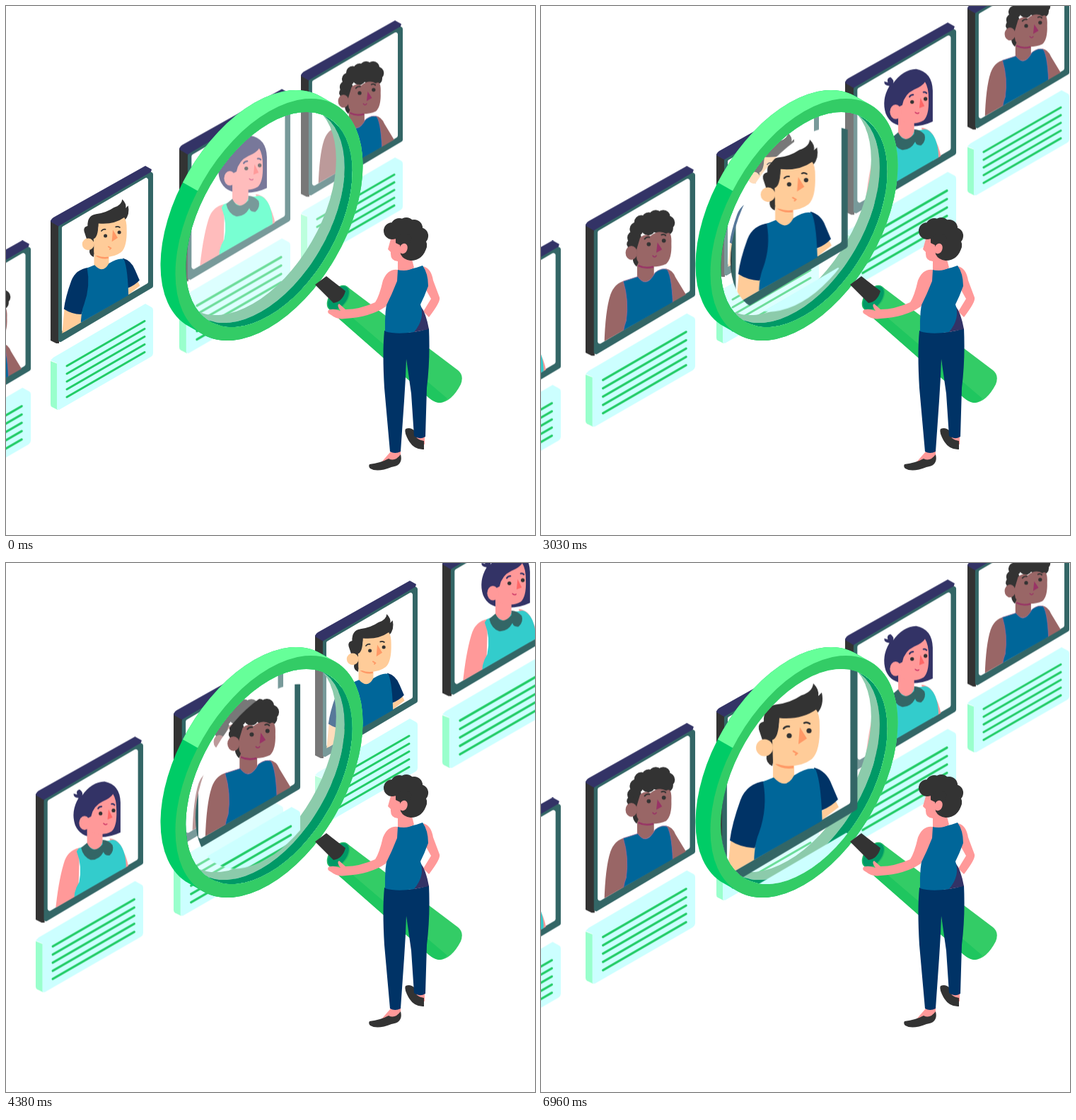
An HTML page without scripts that plays this animation: 748 by 748 pixels, repeating every 8.04 s.

```html
<!DOCTYPE html>
<html lang="en">
<head>
<meta charset="utf-8">
<title>Candidate search</title>
<style>
html, body { margin: 0; width: 100%; height: 100%; overflow: hidden; background: #fff; }
svg { display: block; width: 100%; height: 100%; }
.f { color: #3cc; }
.m, .d { color: #069; }

/* the row of cards jumps between five layouts */
.card { animation: slide 8.04s step-end infinite; }
.dye { animation: slide 8.04s step-end infinite, dye 8.04s step-end infinite; }
@keyframes slide {
  0% { transform: var(--a); }
  20.14% { transform: var(--b); }
  40.67% { transform: var(--c); }
  57.08% { transform: var(--d); }
  83.2%, 100% { transform: var(--e); }
}
@keyframes dye {
  0% { color: #3fb; }
  20.14%, 100% { color: #3cc; }
}

/* the enlarged view pops in and out around the lens centre */
.zoom { transform-origin: 350px 300px; animation: 8.04s linear infinite; }
.z1 { animation-name: z1; }
.z2 { animation-name: z2; }
.z3 { animation-name: z3; }
.z4 { animation-name: z4; }
.z5 { animation-name: z5; }
@keyframes z1 {
  0% { transform: scale(0); animation-timing-function: steps(8); }
  2.98% { transform: scale(1); }
  16.79% { transform: scale(1); animation-timing-function: steps(7); }
  19.4%, 100% { transform: scale(0); }
}
@keyframes z2 {
  0% { transform: scale(0); }
  20.52% { transform: scale(0); animation-timing-function: steps(9); }
  23.88% { transform: scale(1); }
  37.31% { transform: scale(1); animation-timing-function: steps(7); }
  39.92%, 100% { transform: scale(0); }
}
@keyframes z3 {
  0% { transform: scale(0); }
  40.67% { transform: scale(0); animation-timing-function: steps(9); }
  44.02% { transform: scale(1); }
  54.1% { transform: scale(1); animation-timing-function: steps(7); }
  56.71%, 100% { transform: scale(0); }
}
@keyframes z4 {
  0% { transform: scale(0); }
  57.08% { transform: scale(0); animation-timing-function: steps(9); }
  60.44%, 63.79% { transform: scale(1); }
  63.8% { transform: scale(.11); animation-timing-function: steps(8); }
  66.78% { transform: scale(1); }
  80.22% { transform: scale(1); animation-timing-function: steps(7); }
  82.83%, 100% { transform: scale(0); }
}
@keyframes z5 {
  0% { transform: scale(0); }
  83.2% { transform: scale(0); animation-timing-function: steps(9); }
  86.56%, 100% { transform: scale(1); }
}
</style>
</head>
<body>
<svg viewBox="0 0 748 748">
<defs>
  <clipPath id="window"><path d="M16-259L138-330V-178L16-108Z"/></clipPath>
  <clipPath id="hole"><ellipse id="glass" cx="372" cy="302" rx="166.6" ry="96.2" transform="rotate(-60 372 302)"/></clipPath>
  <clipPath id="lit"><path d="M200 221L272 262L560 426V90H200Z"/></clipPath>

  <g id="frame">
    <path fill="#333" d="M0-268L12-261V-94H8L0-98Z"/>
    <path fill="#336" d="M0-266Q0-269 4-272L134-345L143-340L141-333L12-259Z"/>
    <path fill="#366" stroke="#366" stroke-width="6" stroke-linejoin="round" d="M14-258L142-333V-175L14-99Z"/>
    <path fill="#fff" stroke="#fff" stroke-width="6" stroke-linejoin="round" d="M19-257L135-325V-181L19-113Z"/>
    <path fill="#9fc" d="M0-69L10-65V0L2-4Q0-5 0-8Z"/>
    <path fill="#cff" d="M0-70L4-74L134-150L143-145Q145-144 145-141V-80Q145-77 142-75L12 0L9-1V-66Z"/>
    <path stroke="#2c6" stroke-width="3" stroke-linecap="round" d="M23-62l110-63.5M23-51l110-63.5M23-40l110-63.5M23-29l110-63.5M23-18l110-63.5"/>
  </g>

  <g id="man">
    <use href="#frame"/>
    <g clip-path="url(#window)"><g transform="scale(.699) translate(-240 -596)">
      <path fill="#fc9" d="M268 392L263 445L303 425V400ZM390 355L417 337L421 345L395 365Z"/>
      <path fill="#036" d="M318 308Q291 311 282 335Q270 368 267 392Q282 402 302 403L320 360ZM386 289Q404 294 411 313L420 334Q411 344 396 350Z"/>
      <path fill="#333" d="M308 235Q306 226 315 224Q314 203 332 200Q352 198 368 187Q384 182 385 170Q394 179 392 188L397 183Q401 201 390 213L337 225L335 250L327 287Q317 282 319 272L313 250Z"/>
      <path fill="#fc9" d="M328 270L358 283V303Q343 320 328 308Z"/>
      <path fill="currentColor" d="M314 309L329 303Q346 322 358 300Q376 288 388 291Q397 310 398 380L301 430Q301 398 308 382Q321 346 314 309Z"/>
      <path fill="#f96" d="M331 284L357 285V290Q340 292 331 284Z"/>
      <path fill="#fc9" d="M337 219Q368 222 389 207Q394 213 394 230Q395 266 383 277Q370 287 350 287Q332 286 328 278L327 250Q336 248 337 219Z"/>
      <circle cx="316" cy="261" r="12" fill="#fc9"/>
      <path fill="#f96" d="M366 232L376 248L364 256Z"/>
      <path fill="none" stroke="#f96" stroke-width="2.5" stroke-linecap="round" d="M357 266l5 3l-2 2"/>
      <path fill="none" stroke="#333" stroke-width="2.5" stroke-linecap="round" d="M343 234q3-4 8-3M372 226q4-2 8 1"/>
      <circle cx="351" cy="244" r="3.6" fill="#333"/><circle cx="379" cy="237" r="3.6" fill="#333"/>
    </g></g>
  </g>

  <g id="lady">
    <use href="#frame"/>
    <g clip-path="url(#window)"><g transform="scale(.673) translate(-230 -602.5)">
      <path fill="#336" d="M316 213Q305 212 306 204L313 206Q310 198 318 196Q326 202 323 208Q342 181 368 180Q399 186 400 222V282Q377 293 352 291Q320 293 309 267Q300 240 316 213Z"/>
      <path fill="#f99" d="M318 313Q293 318 286 345Q274 385 268 455L310 430Q305 405 316 385ZM378 294Q398 296 405 318Q416 338 419 370L405 372Z"/>
      <path fill="currentColor" d="M316 314L335 306L384 297Q391 297 396 303Q409 315 411 345L411 372L308 425Q304 402 317 382Q324 350 312 320Z"/>
      <path fill="#f99" d="M333 270L364 284V302Q354 328 333 306Z"/>
      <path fill="#366" d="M333 303Q344 328 364 306V297Q375 297 384 307Q388 319 378 328Q368 329 366 321Q357 338 340 337Q325 331 321 313Z"/>
      <path fill="#f99" d="M341 250Q345 229 364 220Q380 213 385 205Q392 215 392 239Q393 270 382 280Q370 287 355 285Q337 283 333 272V254Z"/>
      <ellipse cx="328" cy="263" rx="11" ry="14" fill="#f99"/>
      <path fill="#f66" d="M376 236l8 16l-10 4z"/>
      <path fill="none" stroke="#c36" stroke-width="2" stroke-linecap="round" d="M366 264q4 4 7 1"/>
      <path fill="none" stroke="#336" stroke-width="3" stroke-linecap="round" d="M355 234q2-4 7-4M382 225q4-1 6 2"/>
      <circle cx="360" cy="244" r="3.7" fill="#333"/><circle cx="386" cy="238" r="3.7" fill="#333"/>
    </g></g>
  </g>

  <g id="curly">
    <use href="#frame"/>
    <g clip-path="url(#window)"><g transform="scale(.767) translate(-238 -548)">
      <path fill="#966" d="M306 296Q288 300 281 320Q271 350 270 420L303 400L312 340ZM376 275Q388 277 393 290L413 323L386 350Z"/>
      <path fill="#966" d="M327 262L356 270V286Q344 306 327 292Z"/>
      <path fill="#069" stroke="#969" d="M303 297L328 289Q343 310 358 282Q370 273 379 277Q388 292 389 350L301 405Q302 380 308 365Q313 330 303 297Z"/>
      <path fill="none" stroke="#333" stroke-width="24" stroke-linecap="round" d="M322 222h.1M326 207h.1M334 195h.1M347 190h.1M359 186h.1M372 186h.1M380 196h.1M377 206h.1M346 206h.1M362 202h.1M332 240h.1"/>
      <path fill="#333" d="M309 234Q308 225 320 224L335 250L326 272Q318 264 320 256Z"/>
      <path fill="#966" d="M332 222Q340 214 350 219Q364 207 377 215Q387 208 386 232Q387 258 377 267Q362 274 342 271Q326 267 326 255V242Z"/>
      <ellipse cx="317" cy="248" rx="10" ry="12" fill="#966"/>
      <path fill="none" stroke="#936" stroke-width="3" d="M329 270Q341 276 355 272"/>
      <path fill="#936" d="M362 230L370 242L360 248Z"/>
      <path fill="none" stroke="#936" stroke-width="2" stroke-linecap="round" d="M354 253q3 4 6 0"/>
      <path fill="none" stroke="#333" stroke-width="2.5" stroke-linecap="round" d="M340 224q3-4 8-3M369 217q4-2 7 1"/>
      <circle cx="347" cy="233" r="3.5" fill="#333"/><circle cx="373" cy="227" r="3.5" fill="#333"/>
    </g></g>
  </g>
</defs>

<rect width="748" height="748" fill="#fff"/>

<g class="card" style="--a:translate(417px,363px) scale(.993);--b:translate(603px,268px) scale(.993);--c:translate(790px,160px);--d:var(--c);--e:var(--c)"><use class="d" href="#curly"/></g>
<g class="card f dye" style="--a:translate(245px,491px) scale(1.083);--b:translate(430px,397px) scale(1.083);--c:translate(617px,290px) scale(1.083);--d:translate(800px,190px);--e:var(--d)"><use href="#lady"/></g>
<g class="card" style="--a:translate(63px,571px);--b:translate(248px,477px);--c:translate(437px,370px);--d:translate(590px,289px);--e:translate(790px,180px)"><use class="m" href="#man"/></g>
<g class="card" style="--a:translate(-120px,700px) scale(1.069);--b:translate(63px,595px) scale(1.069);--c:translate(237px,499px) scale(1.069);--d:translate(404px,409px) scale(1.069);--e:translate(603px,268px) scale(.993)"><use class="d" href="#curly"/></g>
<g class="card" style="--a:translate(-309px,790px);--b:translate(-124px,693px) scale(1.048);--c:translate(42px,607px) scale(1.048);--d:translate(227px,511px) scale(1.048);--e:translate(430px,397px) scale(1.083)"><use class="f" href="#lady"/></g>
<g class="card" style="--a:translate(-340px,810px);--b:var(--a);--c:var(--a);--d:translate(48px,604px) scale(1.032);--e:translate(248px,477px)"><use color="#06c" href="#man"/></g>
<g class="card" style="--a:translate(-340px,810px);--b:var(--a);--c:var(--a);--d:var(--a);--e:translate(63px,595px) scale(1.069)"><use class="d" href="#curly"/></g>
<g class="card" style="--a:translate(-330px,800px);--b:var(--a);--c:var(--a);--d:var(--a);--e:translate(-124px,693px) scale(1.048)"><use class="f" href="#lady"/></g>

<!-- glass -->
<use href="#glass" fill="#fff" opacity=".34"/>
<g class="zoom z1"><g clip-path="url(#hole)"><use href="#lady" color="#3c6" transform="translate(230 602.5) scale(1.486)"/></g></g>
<g class="zoom z2"><g clip-path="url(#hole)"><use href="#man" color="#069" transform="translate(240 596) scale(1.43)"/></g></g>
<g class="zoom z3"><g clip-path="url(#hole)"><use href="#curly" transform="translate(238 548) scale(1.304)"/></g></g>
<g class="zoom z4"><g clip-path="url(#hole)"><use href="#lady" color="#3c6" transform="translate(230 602.5) scale(1.486)"/></g></g>
<g class="zoom z5"><g clip-path="url(#hole)"><use href="#man" color="#069" transform="translate(240 596) scale(1.43)"/></g></g>

<!-- rim -->
<g fill-rule="evenodd">
  <g clip-path="url(#hole)">
    <path fill="#8ccbab" d="M444.3 151.7a166.6 96.2 -60 0 0 -166.6 288.6a166.6 96.2 -60 0 0 166.6 -288.6zM432.3 140.7a166.6 96.2 -60 0 0 -166.6 288.6a166.6 96.2 -60 0 0 166.6 -288.6z"/>
    <path fill="#096" d="M455.3 157.7a166.6 96.2 -60 0 0 -166.6 288.6a166.6 96.2 -60 0 0 166.6 -288.6zM444.3 151.7a166.6 96.2 -60 0 0 -166.6 288.6a166.6 96.2 -60 0 0 166.6 -288.6z"/>
  </g>
  <path id="band" fill="#0c6" d="M444.7 127.7a187.4 108.2 -60 0 0 -187.4 324.6L278.3 464.3A187.4 108.2 -60 0 0 465.7 139.7ZM455.3 157.7a166.6 96.2 -60 0 0 -166.6 288.6a166.6 96.2 -60 0 0 166.6 -288.6z"/>
  <path fill="#6f9" clip-path="url(#lit)" d="M444.7 127.7a187.4 108.2 -60 0 0 -187.4 324.6L278.3 464.3A187.4 108.2 -60 0 0 465.7 139.7ZM455.3 157.7a166.6 96.2 -60 0 0 -166.6 288.6a166.6 96.2 -60 0 0 166.6 -288.6z"/>
  <path fill="#3c6" d="M465.7 139.7a187.4 108.2 -60 0 0 -187.4 324.6a187.4 108.2 -60 0 0 187.4 -324.6zM455.3 157.7a166.6 96.2 -60 0 0 -166.6 288.6a166.6 96.2 -60 0 0 166.6 -288.6z"/>
</g>

<!-- handle -->
<path fill="#3c6" d="M484 398L639 515Q648 522 643 535Q630 560 613 561Q605 560 598 554L457 430Z"/>
<path fill="#1fc65f" d="M457 430L482 434L624 555Q618 561 612 561Q605 560 598 554Z"/>
<ellipse cx="470" cy="413" rx="20" ry="12" transform="rotate(-52 470 413)" fill="#096" stroke="#2b6" stroke-width="1.5"/>
<path fill="#333" d="M437 394L453 382L480 403Q476 418 463 420Z"/>

<!-- recruiter -->
<path fill="#f99" d="M589 368Q601 370 604 388L613 412Q615 418 598 440L590 432L601 414L592 398Z"/>
<path fill="#f99" d="M544 630H558V642L530 646ZM577 607H592V620L578 615Z"/>
<path fill="#333" d="M514 648Q530 646 541 640Q550 645 558 634Q562 650 545 652Q525 660 515 654Q512 651 514 648ZM565 598Q572 595 578 601Q577 613 591 615V627Q575 628 567 610Q563 602 565 598Z"/>
<path fill="#036" d="M535 459Q566 466 598 456Q600 500 595 540L593 609Q584 614 577 608L573 548L566 499Q565 530 563 558L558 630Q550 634 543 630L535 540Q532 490 535 459Z"/>
<path fill="#336" d="M586 424Q594 434 598 457L572 462Z"/>
<path fill="#069" d="M553 373Q571 374 589 367Q597 378 597 396Q592 410 586 422Q593 442 577 461Q552 465 536 460Q535 430 541 406Q550 392 553 373Z"/>
<path fill="#f99" d="M554 373Q540 371 533 388Q528 410 522 419Q500 429 480 429L471 421Q467 423 473 431Q462 427 456 430Q453 434 460 437Q468 444 480 442Q515 440 537 425Q546 407 553 389Z"/>
<path fill="#f99" d="M545 326L540 344L544 348Q543 360 554 361V373Q567 376 577 370L572 350L556 330Z"/>
<path fill="#333" d="M551 320H590L595 340Q590 360 572 360Q562 359 558 351L557 338L551 335Z"/>
<path stroke="#333" stroke-width="24" stroke-linecap="round" d="M546 318h.1M556 312h.1M566 311h.1M577 314h.1M585 325h.1M583 338h.1M574 347h.1"/>
<ellipse cx="562" cy="343" rx="5.5" ry="7.5" transform="rotate(20 562 343)" fill="#f99"/>
</svg>
</body>
</html>
```
